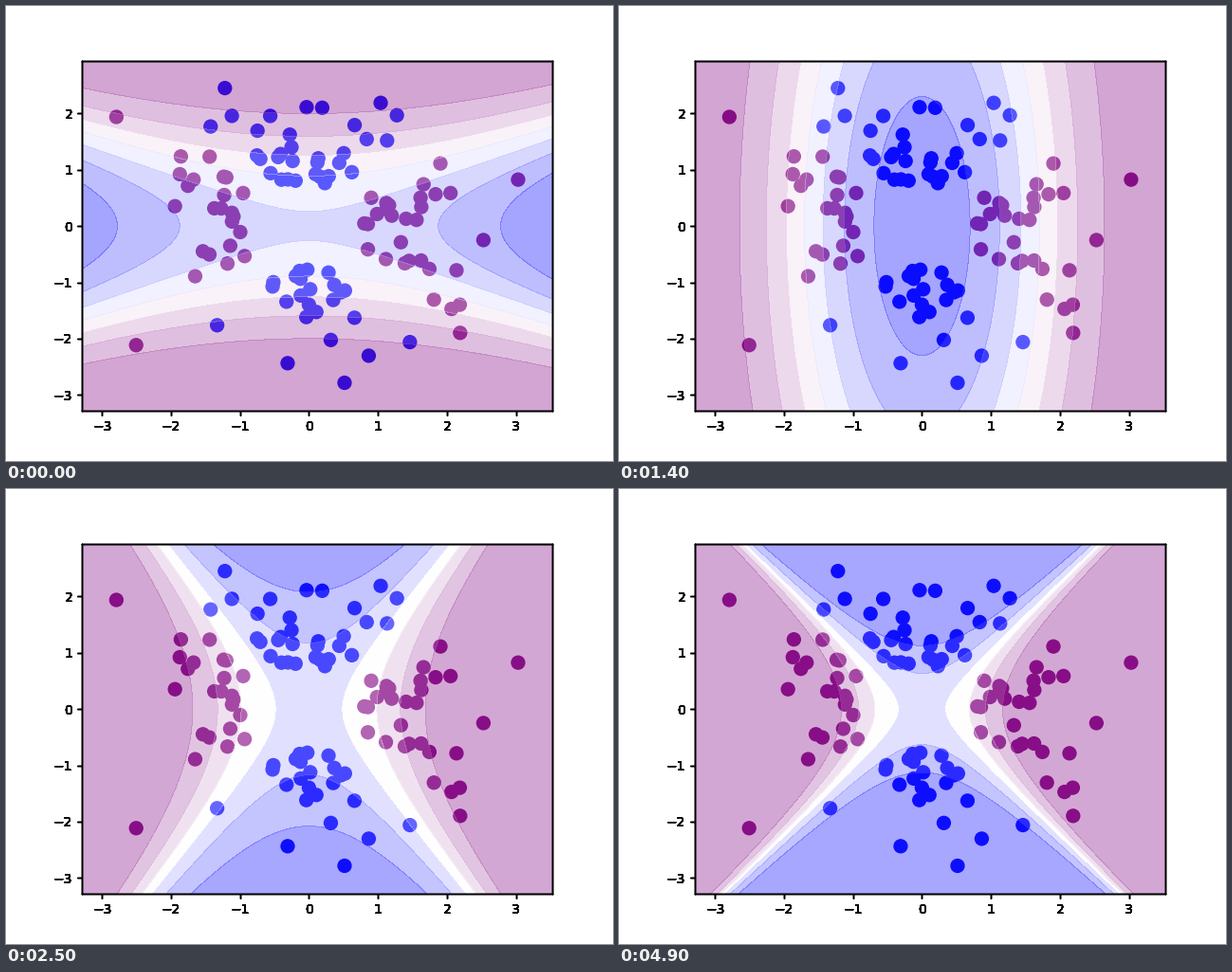
Recreate the animation shown at these times as a matplotlib script. Size 640 by 480 pixels, loop 5000 ms.

```python
import numpy as np
import matplotlib.pyplot as plt
from matplotlib.animation import FuncAnimation

FRAMES, INTERVAL = 50, 100
MARGIN, GRID_STEP = 0.5, 0.02

plt.rcParams["font.family"] = "DejaVu Sans"

# Normal samples, keeping only those clear of the diagonals
rng = np.random.RandomState(1)
samples = rng.randn(200, 2)
score = samples[:, 1]**2 - samples[:, 0]**2
keep = np.abs(score) > 0.5
samples, is_blue = samples[keep], score[keep] > 0

x_axis, y_axis = (np.arange(v.min() - MARGIN, v.max() + MARGIN, GRID_STEP)
                  for v in samples.T)
gx, gy = np.meshgrid(x_axis, y_axis)


def probability(step):
    """Chance of the blue class over the grid after a training step."""
    wx = 0.105 - 0.0369 * step
    wy = -0.56 + 0.0373 * step
    bias = 0.037 + 0.555 * np.sin(np.pi / 2 * min(step / 27, 1))
    return 1 / (1 + np.exp(-(wx * gx**2 + wy * gy**2 + bias)))


def style_axes(axes):
    axes.set(xlim=(x_axis[0], x_axis[-1]), ylim=(y_axis[0], y_axis[-1]),
             xticks=range(-3, 4), yticks=range(-3, 3))


fig, ax = plt.subplots(figsize=(6.4, 4.8), dpi=100)
style_axes(ax)

# Stacked empty axes give the frame and tick labels their heavy look
for _ in range(11):
    overlay = fig.add_axes(ax.get_position())
    overlay.patch.set_visible(False)
    style_axes(overlay)

ax.scatter(*samples.T, s=100, c=np.where(is_blue, "blue", "purple"),
           linewidths=1)

cmap = plt.matplotlib.colors.LinearSegmentedColormap.from_list(
    "classes", ["purple", "white", "blue"])
regions = None


def update(frame):
    global regions
    if regions is not None:
        regions.remove()
    regions = ax.contourf(gx, gy, probability(frame), cmap=cmap, alpha=0.4)
    return [regions]


anim = FuncAnimation(fig, update, frames=FRAMES, interval=INTERVAL,
                     init_func=lambda: [], repeat=True, repeat_delay=0)
plt.show()
```
